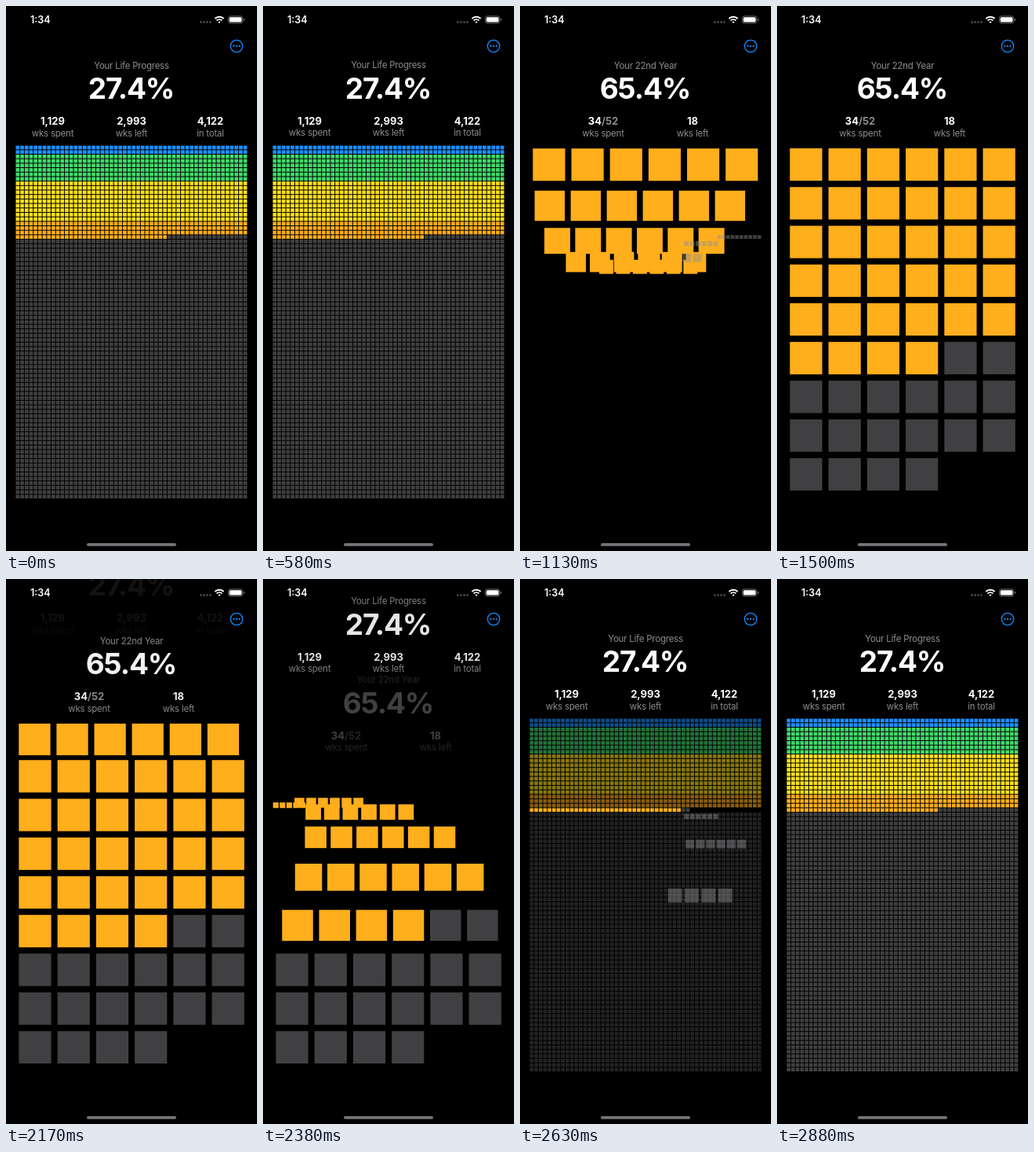
These frames come from a looping animation (320x693 px, 3040 ms). An HTML page with a canvas:

```html
<!DOCTYPE html>
<html lang="en">
<head>
<meta charset="utf-8">
<title>Life Progress</title>
<style>
  html, body { margin: 0; width: 100%; height: 100%; overflow: hidden; background: #000; }
  canvas, svg { position: absolute; left: 0; top: 0; width: 320px; height: 693px; }
  text { font: 11.5px Inter, "Open Sans", sans-serif; letter-spacing: -.02em; fill: #8d8d92; text-anchor: middle; }
  .big { font-size: 37px; font-weight: 700; letter-spacing: -.03em; fill: #fff; }
  .num { font-size: 13px; font-weight: 700; letter-spacing: 0; fill: #fff; }
  .time { font-size: 12.5px; font-weight: 600; letter-spacing: 0; fill: #fff; }
  .muted { fill: #8d8d92; }
</style>
</head>
<body>
<canvas id="cells"></canvas>
<svg viewBox="0 0 320 693">
  <g id="life">
    <text x="160" y="79.5">Your Life Progress</text>
    <text x="159.5" y="118" class="big">27.4%</text>
    <text x="59.5" y="151" class="num">1,129</text>
    <text x="59.5" y="165.5">wks spent</text>
    <text x="160" y="151" class="num">2,993</text>
    <text x="160" y="165.5">wks left</text>
    <text x="260.5" y="151" class="num">4,122</text>
    <text x="260.5" y="165.5">in total</text>
  </g>
  <g id="year">
    <text x="160" y="79.5">Your 22nd Year</text>
    <text x="159.5" y="118" class="big">65.4%</text>
    <text x="106" y="151" class="num">34<tspan class="muted">/52</tspan></text>
    <text x="106" y="165.5">wks spent</text>
    <text x="220" y="151" class="num">18</text>
    <text x="220" y="165.5">wks left</text>
  </g>

  <text x="43.8" y="22" class="time">1:34</text>
  <path d="M248.5 20.5h12.6" stroke="#58585a" stroke-width="2.6" stroke-linecap="round" stroke-dasharray="0 4"/>
  <g fill="none" stroke="#fff" stroke-width="1.9">
    <path d="M266.4 16a8 8 0 0 1 11.2 0M268.6 18.5a4.9 4.9 0 0 1 6.8 0"/>
    <path d="M270.4 20.2a2.4 2.4 0 0 1 3.2 0L272 22z" fill="#fff" stroke="none"/>
  </g>
  <rect x="283.4" y="12.9" width="18.4" height="9" rx="2.7" fill="none" stroke="#77777a" stroke-width=".9"/>
  <rect x="284.7" y="14.2" width="15.8" height="6.4" rx="1.5" fill="#fff"/>
  <path d="M303 15.8a1.7 1.7 0 0 1 0 3.2z" fill="#77777a"/>

  <g fill="#148aff">
    <circle cx="294" cy="51" r="7.7" fill="none" stroke="#148aff" stroke-width="1.3"/>
    <circle cx="290.4" cy="51" r="1.15"/>
    <circle cx="294" cy="51" r="1.15"/>
    <circle cx="297.6" cy="51" r="1.15"/>
  </g>
  <rect x="103" y="683" width="114" height="3.8" rx="1.9" fill="#757577"/>
</svg>

<script>
const LOOP = 3040, COLS = 52, ROWS = 79, YEAR_ROW = 20, SPENT = 34;
const SMALL = { x: 12.5, y: 177.6, pitch: 5.69, size: 4.7 };
const LARGE = { x: 16.4, y: 181, pitch: 49.23, size: 41.2 };
const ORANGE = '#ffae1c', GRAY = 'rgba(142, 142, 147, .45)';
// Each stage of life ends before the given row.
const STAGES = [[2, '#1c90ff'], [8, '#42d96b'], [17, '#ffe01c'], [20, ORANGE], [ROWS, GRAY]];

const canvas = document.getElementById('cells');
const ctx = canvas.getContext('2d');
const ratio = window.devicePixelRatio || 1;
canvas.width = 320 * ratio;
canvas.height = 693 * ratio;
ctx.scale(ratio, ratio);

const smooth = x => {
  x = Math.min(1, Math.max(0, x));
  return x * x * (3 - 2 * x);
};
const mix = (a, b, p) => a + (b - a) * p;

function square(color, x, y, size) {
  ctx.fillStyle = color;
  ctx.fillRect(x, y, size, size);
}

function drawGrid(alpha) {
  ctx.globalAlpha = alpha;
  for (let row = 0; row < ROWS; row++) {
    if (row === YEAR_ROW) continue;
    const color = STAGES.find(([end]) => row < end)[1];
    for (let col = 0; col < COLS; col++)
      square(color, SMALL.x + col * SMALL.pitch, SMALL.y + row * SMALL.pitch, SMALL.size);
  }
  ctx.globalAlpha = 1;
}

// The weeks of one year unfold row by row, six to a row.
function drawYear(growth) {
  for (let week = 0; week < COLS; week++) {
    const row = Math.floor(week / 6), p = growth(row);
    square(week < SPENT ? ORANGE : GRAY,
      mix(SMALL.x + week * SMALL.pitch, LARGE.x + week % 6 * LARGE.pitch, p),
      mix(SMALL.y + YEAR_ROW * SMALL.pitch, LARGE.y + row * LARGE.pitch, p),
      mix(SMALL.size, LARGE.size, p));
  }
}

function place(id, y, alpha) {
  const group = document.getElementById(id);
  group.setAttribute('transform', `translate(0 ${y})`);
  group.setAttribute('opacity', alpha);
}

function draw(t) {
  if (t < 580 || t >= 2880) t = 0;
  else if (t >= 1500 && t < 2170) t = 1600;
  const opening = t < 2000;
  const x = (t - (opening ? 569 : 2117)) / 510;
  const shift = opening ? smooth(x) : 1 - smooth(x);
  const arriving = smooth(1.55 * x), leaving = 1 - smooth(1.3 * x);

  ctx.clearRect(0, 0, 320, 693);
  drawGrid(opening ? 1 - smooth((t - 569) / 330) : smooth((t - 2370) / 500));
  drawYear(row => opening
    ? smooth((t - 822 - row * 45) / 317)
    : 1 - smooth((t - 2144 - row * 40) / 281));
  place('life', -100 * shift, opening ? leaving : arriving);
  place('year', 100 * (1 - shift), opening ? arriving : leaving);
}

function tick() {
  draw(performance.now() % LOOP);
  requestAnimationFrame(tick);
}
tick();
</script>
</body>
</html>
```
